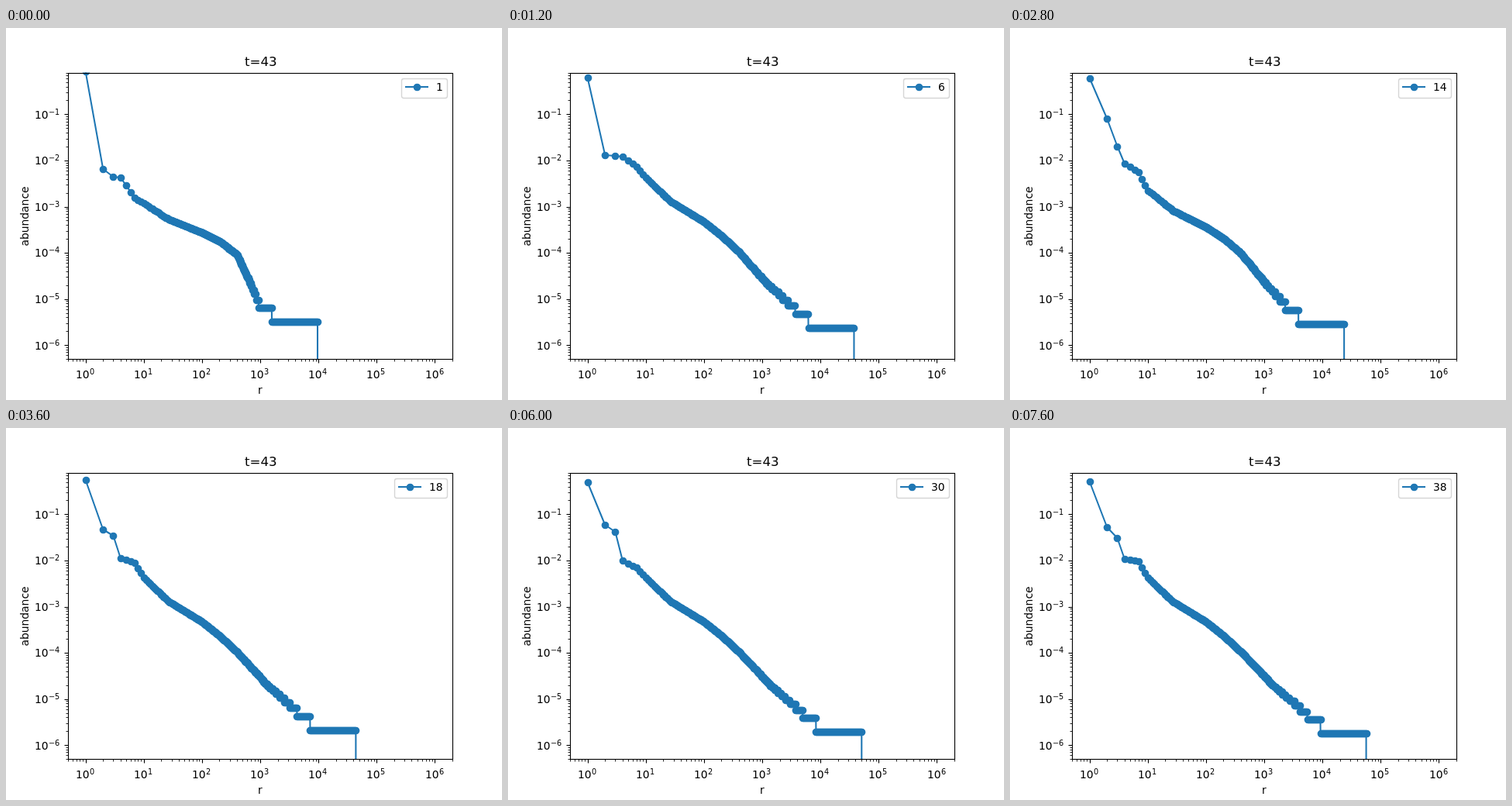
Write an HTML page with a canvas that moves like this. It is 640x480 px and loops after 8000 ms.

```html
<!DOCTYPE html>
<html>
<head>
<meta charset="utf-8">
<style>
  html, body { margin: 0; width: 100%; height: 100%; overflow: hidden; background: #fff; }
  canvas { display: block; }
</style>
</head>
<body>
<canvas id="plot" width="640" height="480"></canvas>
<script>
const ctx = document.getElementById('plot').getContext('2d');
const BLUE = '#1f77b4', FONT = '"DejaVu Sans", sans-serif';
const STEP = 400, COUNT = 20;

// Axes run from 0.5 to 2e6 across and from 0.8 down to 5e-7, both logarithmic
const LEFT = 80, RIGHT = 576, TOP = 57.6, BOTTOM = 427.2;
const XDEC = (RIGHT - LEFT) / Math.log10(4e6);
const YDEC = (BOTTOM - TOP) / Math.log10(0.8 / 5e-7);
const X0 = LEFT + XDEC * Math.log10(2);
const Y0 = TOP + YDEC * Math.log10(0.8);

const xOf = r => X0 + XDEC * Math.log10(r);
const mix = (a, b, t) => a + (b - a) * t;
const mixAll = (a, b, t) => a.map((v, i) => mix(v, b[i], t));

// The body of the curve moves between a sparse and a full shape
const HEAD_RANKS = [1, 2, 3, 4, 7], BODY_RANKS = [10, 27, 100, 200, 400];
const SPARSE = [226, 247, 264, 275, 292], FULL = [193, 224, 250, 268, 289];

// head: heights of the first few points; full: share of the full shape
const poses = [
  { step: 0, label: 1, full: 0, head: [56, 182, 192, 193, 219] },
  { step: 3, label: 6, full: 1, head: [64, 164, 165, 166, 179] },
  { step: 5, label: 10, full: 0, head: [62, 103, 166, 182, 198] },
  { step: 9, label: 18, full: 1, head: [67, 131, 139, 168, 174] },
  { step: 12, label: 23, full: 1, head: [73, 103, 135, 171, 176] },
  { step: 15, label: 30, full: 1, head: [70, 125, 134, 171, 180] },
  { step: 19, label: 38, full: 1, head: [69, 128, 142, 169, 172] }
];

function stateAt(step) {
  let i = 0;
  while (i < poses.length - 2 && poses[i + 1].step <= step) i++;
  const a = poses[i], b = poses[i + 1], t = (step - a.step) / (b.step - a.step);
  const full = mix(a.full, b.full, t);
  const heights = [...mixAll(a.head, b.head, t), ...mixAll(SPARSE, FULL, full)];
  const knots = [...HEAD_RANKS, ...BODY_RANKS].map((r, j) => [xOf(r), heights[j]]);

  // Plateaus of 3, 2 and 1 counts close the tail
  const base = mix(379.3 - 0.6 * step, 385.5 + 0.45 * step, full);
  const end = mix(402 + 1.5 * step, 444 + 0.82 * step, full);
  const level = k => base - YDEC * Math.log10(k);
  const [x, y] = knots[knots.length - 1];
  knots.push([(x + end - 76) / 2, (y + level(3)) / 2 + 5 * full]);
  knots.push([end - 76, level(3)], [end - 59, level(2)], [end, level(1)]);
  return { label: Math.round(mix(a.label, b.label, t)), base, level, end, knots };
}

// One point per visible rank; small abundances fall on whole counts
function curvePoints({ knots, base, level, end }) {
  const points = [], last = Math.round(10 ** ((end - X0) / XDEC));
  let i = 0;
  for (let r = 1; ; r = Math.min(last, Math.max(r + 1, Math.floor(r * 1.004)))) {
    const x = xOf(r);
    while (i < knots.length - 2 && knots[i + 1][0] < x) i++;
    const [xa, ya] = knots[i], [xb, yb] = knots[i + 1];
    const y = mix(ya, yb, Math.min(1, (x - xa) / (xb - xa)));
    const count = Math.max(1, Math.floor(10 ** ((base - y) / YDEC) + 1e-6));
    points.push([x, count < 40 ? level(count) : y]);
    if (r >= last) return points;
  }
}

function line(x1, y1, x2, y2, width, color = '#000') {
  ctx.strokeStyle = color;
  ctx.lineWidth = width;
  ctx.beginPath();
  ctx.moveTo(x1, y1);
  ctx.lineTo(x2, y2);
  ctx.stroke();
}

function text(str, x, y, size, align = 'left') {
  ctx.fillStyle = '#000';
  ctx.font = size + 'px ' + FONT;
  ctx.textAlign = align;
  ctx.fillText(str, x, y);
}

function dot(x, y) {
  ctx.fillStyle = BLUE;
  ctx.beginPath();
  ctx.arc(Math.round(x) + 0.5, Math.round(y) + 0.5, 4.86, 0, 7);
  ctx.fill();
}

function power(exp, x, y) {
  text('10', x, y, 13.89);
  text(String(exp).replace('-', '\u2212'), x + 17.9, y - 5.3, 9.72);
}

function tickX(e, len, width) {
  const x = X0 + XDEC * e, px = Math.round(x) + 0.5;
  if (x > LEFT - 0.1 && x < RIGHT + 0.1) line(px, 427.5, px, 427.5 + len, width);
}

function tickY(e, len, width) {
  const y = Y0 - YDEC * e, py = Math.round(y) + 0.5;
  if (y > TOP - 0.1 && y < BOTTOM + 0.1) line(80.5, py, 80.5 - len, py, width);
}

function drawAxes() {
  for (let e = -7; e <= 6; e++) {
    if (e >= 0) {
      tickX(e, 5, 1.11);
      power(e, Math.floor(X0 + XDEC * e - 12.3), 452);
    } else if (e > -7) {
      tickY(e, 5, 1.11);
      power(e, 37, Math.round(Y0 - YDEC * e + 5.3));
    }
    for (let m = 2; m < 10; m++) {
      const minor = e + Math.log10(m);
      tickX(minor, 3, 0.83);
      tickY(minor, 3, 0.83);
    }
  }
  ctx.strokeStyle = '#000';
  ctx.lineWidth = 1.11;
  ctx.strokeRect(80.5, 58.5, 496, 369);
  text('t=43', 308, 49, 16.67);
  text('r', 325, 472, 13.89);
  ctx.save();
  ctx.translate(29, 243);
  ctx.rotate(-Math.PI / 2);
  text('abundance', 0, 0, 13.89, 'center');
  ctx.restore();
}

function drawCurve(points) {
  ctx.save();
  ctx.beginPath();
  ctx.rect(LEFT, TOP, RIGHT - LEFT, BOTTOM - TOP);
  ctx.clip();
  ctx.strokeStyle = BLUE;
  ctx.lineWidth = 2.08;
  ctx.lineJoin = 'round';
  ctx.beginPath();
  points.forEach(([x, y]) => ctx.lineTo(x, y));
  ctx.lineTo(points[points.length - 1][0], 500);
  ctx.stroke();
  let seen = '';
  for (const [x, y] of points) {
    const spot = Math.round(x) + ',' + Math.round(y);
    if (spot !== seen) dot(x, y);
    seen = spot;
  }
  ctx.restore();
}

function drawLegend(label) {
  const shift = label > 9 ? -9 : 0;
  ctx.beginPath();
  ctx.roundRect(510.5 + shift, 65.5, 59 - shift, 25, 2.8);
  ctx.fillStyle = 'rgba(255,255,255,.8)';
  ctx.fill();
  ctx.strokeStyle = 'rgba(204,204,204,.8)';
  ctx.lineWidth = 1.39;
  ctx.stroke();
  line(515 + shift, 76, 545 + shift, 76, 2.08, BLUE);
  dot(530 + shift, 76);
  text(label, 555 + shift, 81, 13.89);
}

let shown = -1;
function tick(now) {
  const step = Math.floor(now / STEP) % COUNT;
  if (step !== shown) {
    shown = step;
    const state = stateAt(step);
    ctx.fillStyle = '#fff';
    ctx.fillRect(0, 0, 640, 480);
    drawCurve(curvePoints(state));
    drawAxes();
    drawLegend(state.label);
  }
  requestAnimationFrame(tick);
}
tick(0);
</script>
</body>
</html>
```
